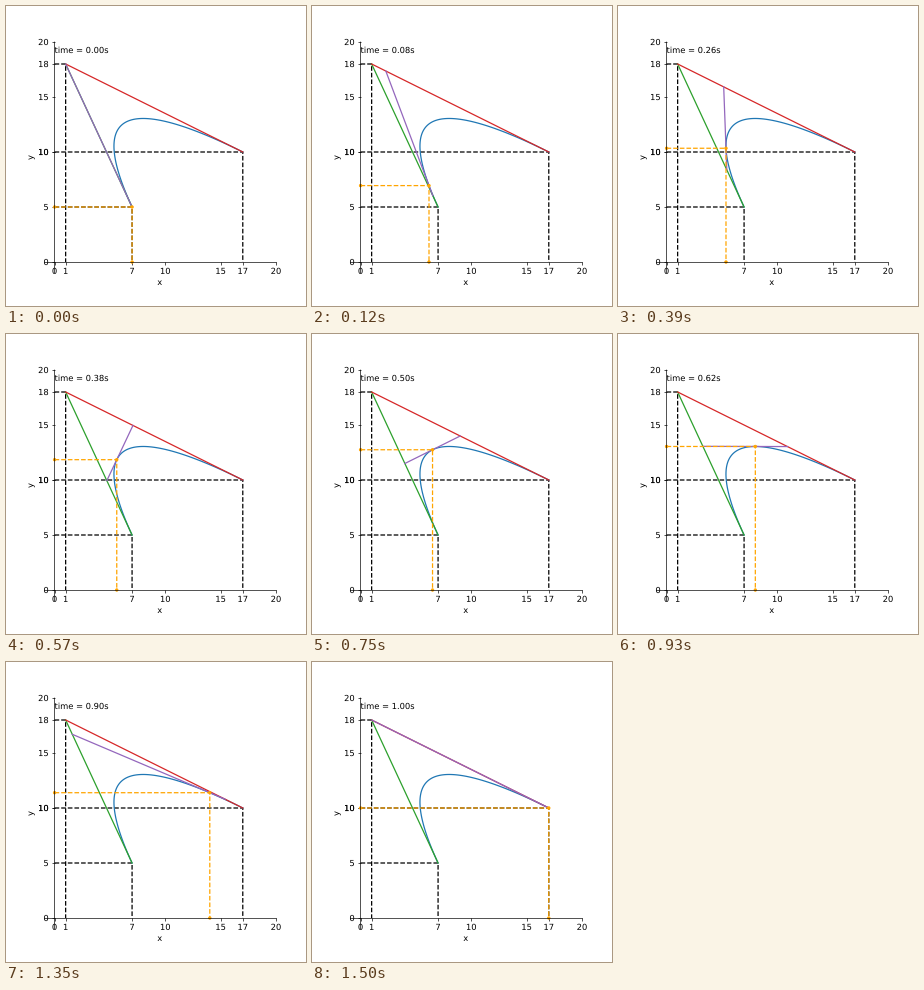
A matplotlib script for the animation above (1530 ms loop, 300 px wide and 300 px high).

```python
import numpy as np
import matplotlib.pyplot as plt
from matplotlib.animation import FuncAnimation
from matplotlib.patheffects import Normal

STEPS = 50
START, CONTROL, END = np.array([[7, 5], [1, 18], [17, 10]], dtype=float)

# Drawing text and markers as paths keeps them at sub-pixel positions.
plt.rcParams.update({"path.effects": [Normal()], "text.hinting": "none"})


def lerp(a, b, t):
    return a + (b - a) * t


def bezier(t):
    """Return both ends of the moving segment and the curve point on it."""
    a, b = lerp(START, CONTROL, t), lerp(CONTROL, END, t)
    return a, b, lerp(a, b, t)


def guide(p):
    """Path from the y axis to the point and down to the x axis."""
    return [0, p[0], p[0]], [p[1], p[1], 0]


fig, ax = plt.subplots(figsize=(5, 5), dpi=60)
ax.set(xlim=(-1, 20), ylim=(-1, 20), xlabel="x", ylabel="y")
ax.set_xticks([0, 10, 15, 20, 7, 1, 17])
ax.set_yticks([0, 10, 15, 20, 5, 18, 10])
for side in ("left", "bottom"):
    ax.spines[side].set_position("zero")
for side in ("right", "top"):
    ax.spines[side].set_visible(False)
ax.spines["left"].set_snap(False)


def line(xs=(), ys=(), style="-", **kw):
    return ax.plot(xs, ys, style, snap=False, **kw)[0]


for p in (START, CONTROL, END):
    line(*guide(p), "--", color="black")

curve = np.array([bezier(t)[2] for t in np.linspace(0, 1, 101)])
line(*curve.T, color="C0")
line(*zip(START, CONTROL), color="C2")
line(*zip(CONTROL, END), color="C3")
segment = line(color="C4")
tracker = line(style=".--", color="orange")
label = ax.text(0, 19, "")


def update(i):
    t = i / STEPS
    a, b, p = bezier(t)
    segment.set_data(*zip(a, b))
    tracker.set_data(*guide(p))
    label.set_text(f"time = {t:.2f}s")
    return segment, tracker, label


anim = FuncAnimation(fig, update, frames=STEPS + 1, interval=30,
                     repeat=True, repeat_delay=0)
plt.show()
```
